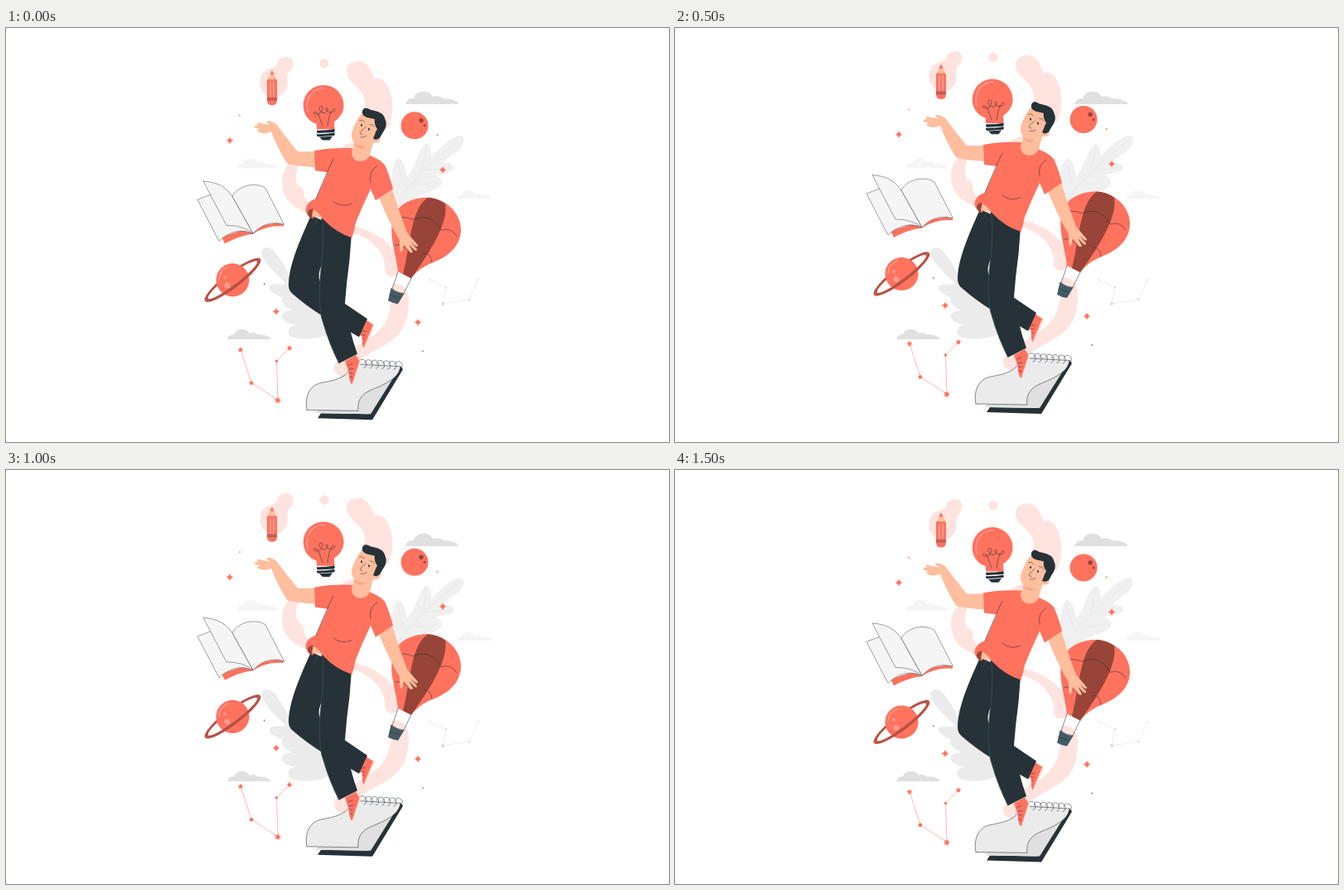
Recreate the animation shown at these times as an HTML page. Size 800 by 500 pixels, loop 1.54 s.

```html
<!DOCTYPE html>
<html lang="en">
<head>
<meta charset="utf-8">
<title>Floating ideas</title>
<style>
  html, body { margin: 0; width: 100%; height: 100%; overflow: hidden; background: #fff; }
  svg { display: block; width: 100%; height: 100%; }
  .red { fill: #ff725e; }
  .dark { fill: #263238; }
  .skin { fill: #ffbe9d; }
  .pink { fill: #ffe3df; }
  .maroon { fill: #994438; }
  .ring { fill: #b75043; }
  .paper { fill: #f5f5f5; }
  .line { fill: none; stroke: #263238; stroke-width: .55; stroke-linecap: round; stroke-linejoin: round; }
  .page { fill: #f5f5f5; stroke: #263238; stroke-width: .45; stroke-linejoin: round; }
  .shine { fill: none; stroke: #ff9c8e; stroke-width: 1.5; stroke-linecap: round; }
</style>
</head>
<body>
<svg viewBox="0 0 800 500">
  <defs>
    <path id="cloud" d="M0 0Q2-8 10-7C13-18 29-17 33-9C39-11 43-9 45-7Q61-7 65 0Z"/>
    <path id="sparkle" d="M0-4.6Q1-1 4.4 0Q1 1 0 4.6Q-1 1-4.4 0Q-1-1 0-4.6Z"/>
    <path id="star" d="M0-4L1.2-1.4 4-1 2 1 2.5 4 0 2.6-2.5 4-2 1-4-1-1.2-1.4Z"/>
  </defs>

  <!-- still backdrop -->
  <g fill="#e0e0e0">
    <use href="#cloud" transform="translate(482 92)"/>
    <use href="#cloud" transform="translate(267 376) scale(.815)"/>
  </g>
  <g class="paper">
    <use href="#cloud" transform="translate(278 169.5) scale(.8)"/>
    <use href="#cloud" transform="translate(544 206) scale(.66)"/>
  </g>
  <path fill="#f0f0f0" d="M468 215C461 190 467 158 473 157C480 159 483 171 484 179C495 168 498 144 507 140C514 141 512 149 514 154C524 146 536 130 549 130C556 134 552 144 543 150C537 154 531 158 528 163C535 162 541 165 541 169C538 177 522 175 518 178C526 180 529 188 523 192C512 200 490 202 482 215Z"/>
  <path fill="none" stroke="#e0e0e0" stroke-width=".5" d="M470 212Q500 170 547 136M483 193Q475 180 473 163M500 174Q507 160 507 143M503 171Q520 172 536 168M488 188Q505 190 520 186"/>
  <path fill="#ebebeb" d="M308 271C309 264 318 263 323 269C332 279 338 290 343 302L380 340 392 368C380 377 340 380 340 366C342 359 349 358 356 358C343 360 331 354 333 346C336 341 341 342 346 341C338 338 329 330 334 326C326 322 316 318 318 313C321 307 332 311 338 309C327 297 311 285 308 271Z"/>
  <g fill="#dcdcdc">
    <path fill="none" stroke="#dcdcdc" stroke-width=".5" d="M511 304L531 313 527 333 559 328 570 304"/>
    <circle cx="511" cy="304" r=".9"/><circle cx="531" cy="313" r="1.2"/><circle cx="527" cy="333" r="2"/>
    <circle cx="559" cy="328" r="1.2"/><circle cx="570" cy="304" r=".9"/>
  </g>

  <g id="float">
    <!-- ribbon -->
    <g class="pink">
      <path d="M411 51C411 42 420 39 428 40C438 43 441 52 445 62C449 58 456 62 460 69C469 85 468 104 461 120L440 130 430 100C438 88 430 77 420 68C414 63 411 57 411 51Z"/>
      <path d="M403 146Q410 138 422 138L420 148Z"/>
      <path d="M341 164C331 175 331 191 337 203C344 216 356 220 372 226L378 212C366 212 361 209 360 204C360 196 358 192 353 190C348 184 350 173 353 166Z"/>
      <path d="M417 239C442 243 465 258 472 276L473 296C470 302 459 302 457 292C459 275 445 254 417 247Z"/>
      <path d="M466 309C476 306 486 314 486 328C486 350 481 369 461 380C446 390 424 397 420 414L410 421C399 422 393 412 397 405C410 388 433 381 449 366C465 352 465 332 466 309Z"/>
      <path d="M327 44C328 36 336 32 343 36C349 41 347 49 341 54C338 58 341 62 339 71C336 81 327 86 318 83C308 79 304 68 308 57C312 48 323 49 327 44Z"/>
      <circle cx="384" cy="42.5" r="5.7"/>
    </g>

    <!-- pencil -->
    <path class="skin" d="M315 63L321 51 327 63Z"/>
    <path class="red" d="M318.4 56L321 50.5 323.6 56ZM315 62.5Q318 60.5 321 62.5Q324 60.5 327 62.5V87Q327 93 321 93Q315 93 315 87Z"/>
    <path fill="none" stroke="#ffd6ce" stroke-width=".8" d="M319 64V83M323 64V83"/>
    <path class="line" d="M315 84.5H327M315 86.5H327"/>

    <!-- light bulb -->
    <path class="red" d="M375 122L374.5 115.5C364 112 358.7 103 358.7 93A24.4 24.4 0 0 1 407.5 93C407.5 102 403 108 396 113L396.5 122Z"/>
    <path class="shine" d="M364 101C361 87 367 76 378 73M380 72.3L384 72.5"/>
    <path class="line" d="M382 118L377 104C373 98 368 103 374 104C382 104 384 94 380 94C375 95 380 104 385 102C390 99 388 94 386 97C386 103 398 103 397 98C394 95 390 102 388 118"/>
    <path class="dark" d="M375.5 123.3Q386 123.5 396 121.8Q398 124 395.5 125.7L376 126.7Q374 125 375.5 123.3ZM375.5 127.8Q386 128 396 126.3Q398 128 395.5 129.7L376.5 130.9Q374 129.5 375.5 127.8ZM378 131.5L394 130.5 390.5 135.3H382Z"/>

    <!-- small planet -->
    <circle class="red" cx="493" cy="117.5" r="16.5"/>
    <g class="maroon"><circle cx="501" cy="111.5" r="2.7"/><circle cx="505" cy="117.5" r="1.5"/><circle cx="501.5" cy="123" r=".7"/></g>

    <!-- balloon -->
    <path class="red" d="M473 294C470 270 463 255 466 233C470 213 490 204 509 204.5C532 206 549 224 549 244C548 263 535 275 515 283C503 288 495 294 489 302Z"/>
    <path class="maroon" d="M509 204.5Q521 205 530 212C534 235 512 270 489 302L479 297C489 255 489 218 509 204.5Z"/>
    <path class="line" d="M467 232Q478 225 491 231Q513 222 525 244Q537 240 544 251M470 262Q477 260 485 268M504 272Q513 271 514 283"/>
    <path class="line" d="M473 294L466 315M489 302L480 320"/>
    <path fill="#455a64" d="M464.5 314Q472 320 480.5 320.5L473 333Q466 332 461 329Z"/>
    <path class="line" d="M464.5 314Q472 320 480.5 320.5M463 322L475 326"/>

    <!-- open book -->
    <path class="red" d="M260 252L264 260C275 254 286 250 298 248.5C312 240 324 238 335 239.5L334 234 298 240Z"/>
    <path class="page" d="M231 207L247 201Q265 196 273 203L298 248C280 240 266 249 257 257Z"/>
    <path class="page" d="M273 203C281 188 303 186 313 193L335.5 237C322 233 309 236 298 248Z"/>
    <path class="page" d="M238 184.5C255 186 265 191 273 203L298 248Q287 238 266 238Z"/>

    <!-- ringed planet -->
    <g transform="translate(273.5 304) rotate(-37.3)">
      <path class="ring" d="M-42 0A42 9.5 0 0 1 42 0H37A37 6.5 0 0 0-37 0Z"/>
      <circle class="red" r="20"/>
      <path class="ring" d="M-42 0A42 9.5 0 0 0 42 0H37A37 6 0 0 1-37 0Z"/>
    </g>
    <g fill="#ff9c8e"><circle cx="267" cy="310.5" r="3.5"/><circle cx="264" cy="301" r="2"/></g>
    <path class="shine" d="M257 304Q257 293 268 288"/>

    <!-- stars and dots -->
    <g class="red">
      <path fill="none" stroke="#ff725e" stroke-width=".5" d="M283 388L296 428 328 449 326.5 402 342 386"/>
      <use href="#star" transform="translate(283 388) scale(.85)"/>
      <use href="#star" transform="translate(342 386) scale(.85)"/>
      <use href="#star" transform="translate(328 449) rotate(15)"/>
      <circle cx="296" cy="428.5" r="2.3"/><circle cx="326.5" cy="402" r="1.7"/>
      <use href="#sparkle" x="270" y="135.5"/><use href="#sparkle" x="527" y="171"/>
      <use href="#sparkle" x="326" y="342"/><use href="#sparkle" x="497" y="355"/>
      <circle cx="520.5" cy="129" r="1"/><circle cx="282" cy="105.3" r=".9"/>
    </g>
    <g fill="#737373"><circle cx="311.7" cy="308.7" r=".9"/><circle cx="503" cy="390" r=".9"/></g>

    <!-- notepad -->
    <path class="dark" d="M476 408L479 412 442 473 376 471 380 465 437 466Z"/>
    <path fill="#e0e0e0" d="M428 404L476 408.5 440 466 374 465 380 455Z"/>
    <path fill="#ebebeb" d="M428 404L476 408.5C474 425 451 432 438 438C426 444 424 453 425 462L363 461C360 445 366 431 381 428C400 425 414 420 415 409Z"/>
    <path class="line" d="M363 461C360 445 366 431 381 428C400 425 412 420 415 411M363 461L425 462C424 453 426 444 438 438C451 432 474 425 476 408.5L428 406"/>
    <g id="rings" class="line"></g>

    <!-- shoes -->
    <path fill="#ffd9d2" d="M441 356L445 359 432 387 430 385Z"/>
    <path class="red" d="M434 352L443 358 431.5 386Q429 382 430 373L426 370Z"/>
    <path fill="#ffd9d2" d="M424 397L428 401 419 430 416 429Z"/>
    <path class="red" d="M409 402L422 395 426.5 402 417.5 430Q414 428 413.5 415Z"/>
    <path class="line" d="M430 366L434 366M430 370L433 371M430 374L432 375M413 407L418 405M414 412L419 411M414.5 416L418 417M415 421L418 422"/>

    <!-- trousers -->
    <path class="dark" d="M368 226C357 251 341 285 341 310Q341 317 346 321Q362 335 381 347L426 373 436 351 408 332 400 240Z"/>
    <path fill="#fff" d="M382 284Q375 297 379 306Z"/>
    <path class="dark" d="M380 228C385 245 382 272 379 300C378 322 378 343 382 354Q390 382 401.5 405L424 393.5Q414 366 409 332Q411 305 414.5 280L417 248Z"/>
    <path fill="none" stroke="#455a64" stroke-width=".6" d="M382 232C384 250 382 275 379 300C378 322 378 343 382 354Q390 382 402 404M376 229Q375 236 370 239"/>

    <!-- arms -->
    <path class="skin" d="M374 149L352 149Q338 132 327 117Q322 112 315 112Q313 114 319 117L304 114Q302 115 304 117Q299 117 300 120L306 122Q302 123 304 125Q311 129 320 125Q328 146 339 163Q343 166 374 168Z"/>
    <path class="skin" d="M449 202L466 194Q474 221 484 247L497 262Q497 265 494 263L488 258 496 267Q496 270 493 268L486 261 491 270Q489 273 486 269L480 261 478 270Q475 271 475 266L475 256Q461 233 449 202Z"/>

    <!-- shirt -->
    <path class="red" d="M374 206C366 208 360 215 362 222Q365 229 370 230L384 215Z"/>
    <path class="maroon" d="M371 218Q364 218 364 224Q365 228 369 230Z"/>
    <path class="skin" d="M371 218L369 227 383 230 380 220Z"/>
    <path class="red" d="M372 148Q393 144 417 145L440 154Q452 159 457 165Q463 178 467 194L446 208 440 194Q430 215 422 235Q420 245 417.5 253Q398 247 383 231Q378 223 371 219L373 208 388 174 373 172Z"/>
    <path class="line" d="M395 158Q386 176 374 206M440 186Q437 173 448 166M395 209Q404 217 417 212"/>

    <!-- head -->
    <path class="skin" d="M420 134Q420 144 417 149Q417 160 427 161Q436 161 439 153L444 135Z"/>
    <path fill="#ff9c7d" d="M420 139Q428 145 437 141L430 145Q422 144 420 139Z"/>
    <path class="skin" d="M429 103Q420 115 417 127C416 136 422 142 430 142Q439 143 444 138Q452 139 452 132L450 115 438 102Z"/>
    <path class="dark" d="M430 103C429 98 433 95 437 97C441 100 447 99 451 102C456 104 457 108 458.500 113C460 120 455 125 453 129C451 134 446 136 443 133C445 130 445 126 448 122C446 118 444 115 445 110C438 108 432 108 430 103Z"/>
    <path class="line" d="M426.500 111Q430 110 432.500 113M439 116Q443 116 445 119M434 119Q429 123 427 126.500Q428 128 430 128M428 131.500Q431 133 435 130"/>
    <g class="dark"><ellipse cx="429" cy="117" rx="1" ry="1.5"/><ellipse cx="438" cy="122" rx="1" ry="1.5"/></g>
  </g>
</svg>
<script>
  const LOOP = 1540;
  const float = document.getElementById('float');

  // spiral binding
  let coils = '';
  for (let i = 0; i < 7; i++) {
    coils += `<path d="M${426 + i * 7.2} ${404 + i * .4}c0-6 9-5 9 1q0 5-3 5"/>`;
  }
  document.getElementById('rings').innerHTML = coils;

  function draw(now) {
    const phase = (now % LOOP + 45) / LOOP * 2 * Math.PI;
    float.setAttribute('transform', `translate(0 ${4.6 * Math.cos(phase) - 4.2})`);
    requestAnimationFrame(draw);
  }
  draw(performance.now());
</script>
</body>
</html>
```
